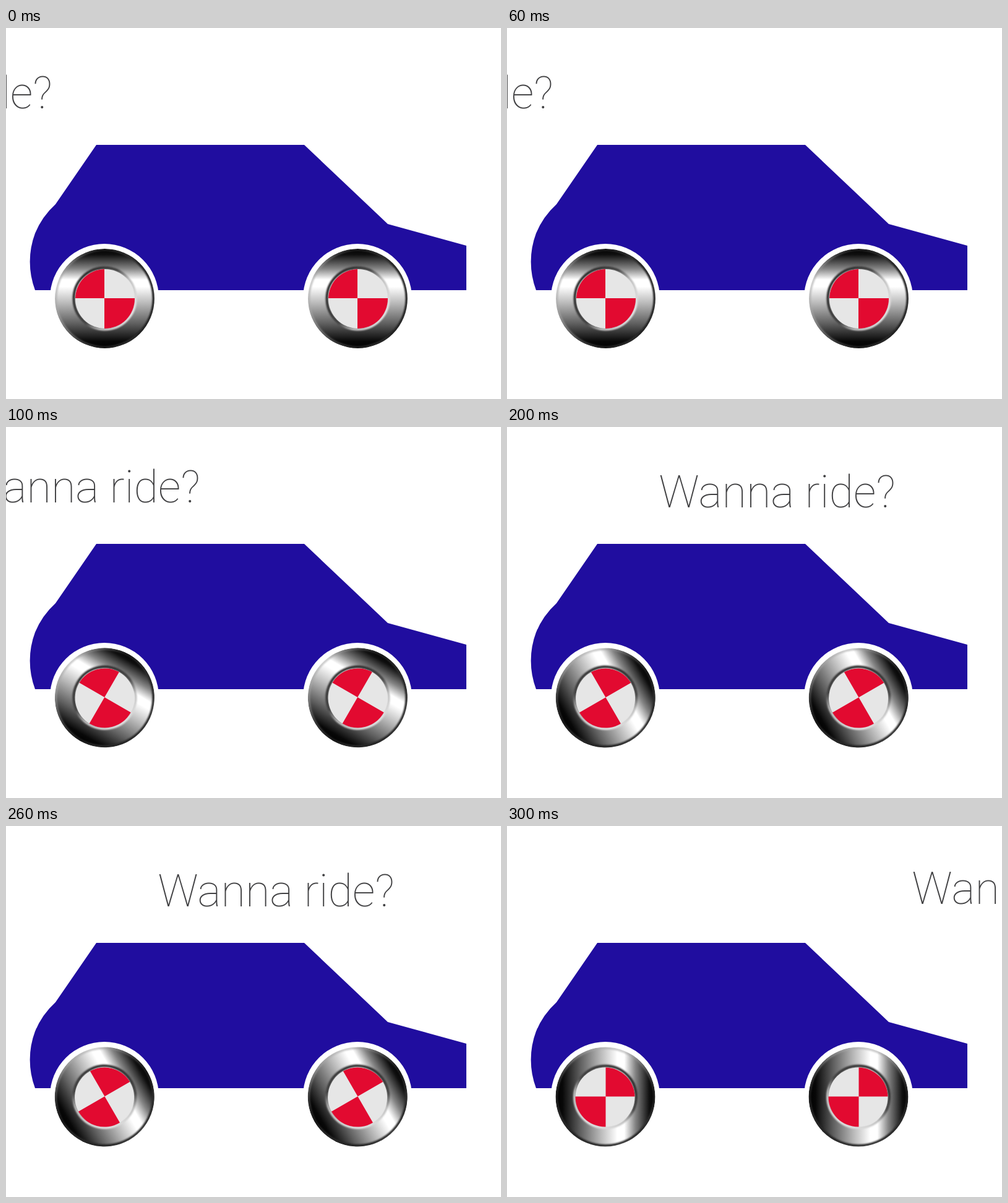
These frames come from a looping animation (800 by 600 pixels, 0.4 s). An HTML page:

```html
<!DOCTYPE html>
<html lang="en">
<head>
<meta charset="utf-8">
<title>Wanna ride?</title>
<style>
  html, body { margin: 0; width: 100%; height: 100%; overflow: hidden; background: #fff; }
  svg { display: block; width: 100vw; height: 100vh; }
  text { font: 100 72px Roboto, sans-serif; fill: #414143; text-anchor: middle; }
</style>
</head>
<body>
<svg viewBox="0 0 800 600">
  <defs>
    <linearGradient id="chrome" x1="0" y1="0" x2="0" y2="1">
      <stop offset="0" stop-color="#000"/>
      <stop offset=".06" stop-color="#101010"/>
      <stop offset=".2" stop-color="#858585"/>
      <stop offset=".31" stop-color="#fff"/>
      <stop offset=".38" stop-color="#fff"/>
      <stop offset=".55" stop-color="#b8b8b8"/>
      <stop offset=".75" stop-color="#606060"/>
      <stop offset=".93" stop-color="#080808"/>
      <stop offset="1" stop-color="#000"/>
    </linearGradient>
    <linearGradient id="edge">
      <stop offset="0" stop-color="#aaa" stop-opacity=".6"/>
      <stop offset=".5" stop-color="#555" stop-opacity=".3"/>
      <stop offset=".85" stop-color="#222"/>
    </linearGradient>
    <linearGradient id="rim" x1="0" y1=".2" x2="1" y2=".8">
      <stop offset="0" stop-color="#222"/>
      <stop offset=".45" stop-color="#444"/>
      <stop offset=".65" stop-color="#bbb"/>
      <stop offset="1" stop-color="#eee"/>
    </linearGradient>
    <filter id="soft"><feGaussianBlur stdDeviation=".8"/></filter>
    <clipPath id="tyre"><circle cx=".5" r="80.5"/></clipPath>
    <clipPath id="hub"><circle cx="1" cy=".5" r="48"/></clipPath>
    <g id="wheel">
      <g clip-path="url(#tyre)">
        <circle cx=".5" r="80.5" fill="url(#chrome)"/>
        <circle cx=".5" r="79" fill="none" stroke="url(#edge)" stroke-width="4" filter="url(#soft)"/>
      </g>
      <circle cx=".5" r="50" fill="none" stroke="url(#rim)" stroke-width="4" filter="url(#soft)"/>
      <g clip-path="url(#hub)">
        <path d="M-60-60H60V60H-60Z" fill="#e6e6e6"/>
        <path d="M-60-60H0V60H60V-.5H-60Z" fill="#e20a30"/>
      </g>
    </g>
  </defs>

  <path d="M146 189H482L617 317L744 352V424H47A131 131 0 0 1 47 332A131 131 0 0 1 80 285Z" fill="#200d9f"/>
  <g fill="#fff">
    <circle cx="159" cy="437" r="88"/>
    <circle cx="568" cy="437" r="88"/>
  </g>
  <g transform="translate(159 437.5)"><use class="spin" href="#wheel"/></g>
  <g transform="translate(568 437.5)"><use class="spin" href="#wheel"/></g>
  <text id="question">Wanna ride?</text>
</svg>
<script>
  const STEP_MS = 100;
  const textPoses = [[-116.5, 130], [122.5, 122], [436.5, 130], [845.5, 126]];
  const wheels = document.querySelectorAll(".spin");
  const question = document.getElementById("question");

  function draw(now) {
    const step = Math.floor(now / STEP_MS) % textPoses.length;
    const [x, y] = textPoses[step];
    question.setAttribute("x", x);
    question.setAttribute("y", y);
    for (const wheel of wheels) wheel.setAttribute("transform", `rotate(${step * 30})`);
  }

  let start;
  function tick(now) {
    start ??= now;
    draw(now - start);
    requestAnimationFrame(tick);
  }
  draw(0);
  requestAnimationFrame(tick);
</script>
</body>
</html>
```
